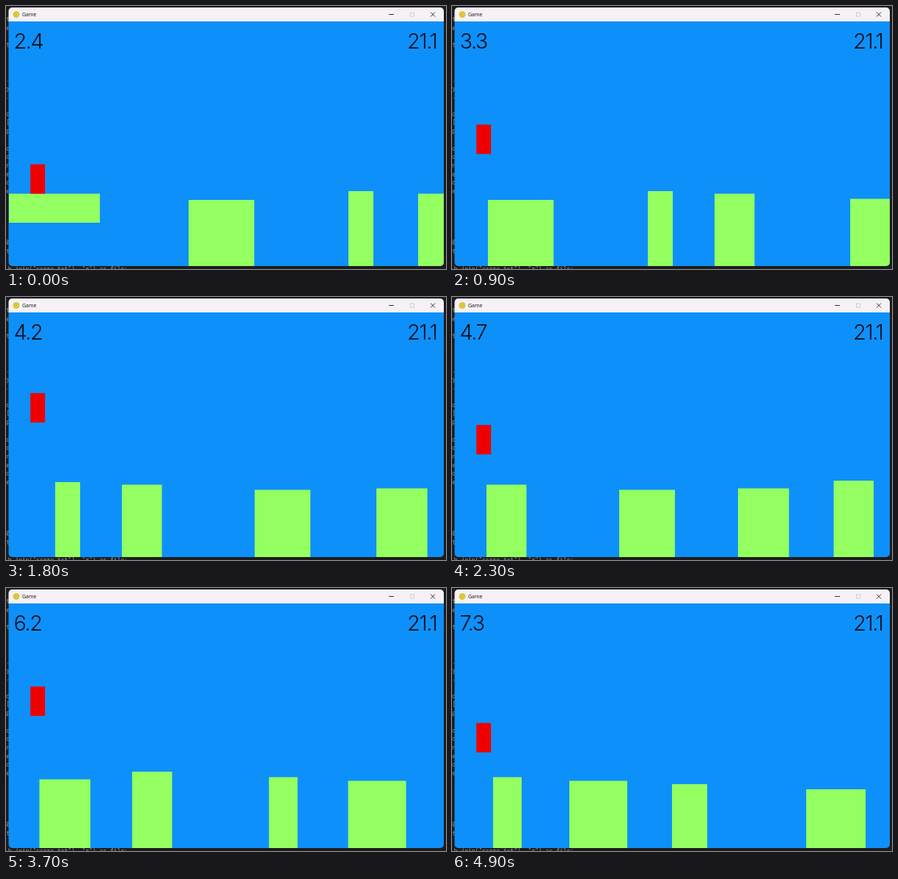
Write an HTML page with a canvas that moves like this. It is 600 px wide and 358 px high and loops after 5 s.

```html
<!DOCTYPE html>
<html lang="en">
<head>
<meta charset="utf-8">
<title>Game</title>
<style>
html, body { margin: 0; width: 100%; height: 100%; overflow: hidden; background: #1c1c1c; }
canvas { display: block; }
</style>
</head>
<body>
<canvas id="stage" width="600" height="358"></canvas>
<script>
const ctx = document.getElementById("stage").getContext("2d");
const LEFT = 4, STEP = 4, GRAVITY = 1290;
const PLAYER = { x: 33.2, w: 20, h: 40 };

// key points of the run: [seconds, scroll distance, score]
const TIME = 0, SCROLL = 1, SCORE = 2;
const run = [[0, 0, 2.4], [2.3, 511, 4.7], [3.1, 700, 5.5], [4.2, 985, 6.7], [4.9, 1158, 7.3]];

// the level: [x, width, top]; every platform from the fourth on is nudged once
const level = [
  [4, 124, 255.5], [249, 89.5, 264], [467, 34, 252], [562, 54.5, 255.5],
  [743, 76, 262.5], [905, 69.5, 260.5], [1031.5, 54.5, 250], [1218, 39, 257.5],
  [1322, 79, 262.5], [1462, 48, 267], [1641, 81, 274]
].map(([x, w, top], i) => ({ x, w, top, right: x + w - (i > 2 ? STEP : 0) }));

// the player leaps off each platform as its end arrives: [next platform, air time]
const leaps = [[1, 0.67], [2, 0.74], [3, 0.506], [4, 0.658], [6, 0.74], [7, 0.555]];

const editor = "t|e||ct||||.|ay|.||lo|[|pp||to|to|en|e|to|se||||||0|t".split("|");

function rect(color, x, y, w, h) {
  ctx.fillStyle = color;
  ctx.fillRect(x, y, w, h);
}

function text(str, x, y, font, color, spacing = "0px") {
  ctx.font = font;
  ctx.letterSpacing = spacing;
  ctx.fillStyle = color;
  ctx.fillText(str, x, y);
}

function line(x1, y1, x2, y2) {
  ctx.beginPath();
  ctx.moveTo(x1, y1);
  ctx.lineTo(x2, y2);
  ctx.stroke();
}

// reads one column of the run at a given value of another
function convert(value, from, to) {
  let i = 1;
  while (i < run.length - 1 && run[i][from] < value) i++;
  const a = run[i - 1], b = run[i];
  return a[to] + (b[to] - a[to]) * (value - a[from]) / (b[from] - a[from]);
}

function playerY(t) {
  let ground = level[0], y = ground.top;
  for (const [next, air] of leaps) {
    const age = t - convert(ground.right - PLAYER.x, SCROLL, TIME);
    if (age < 0) break;
    const p = Math.min(age / air, 1), goal = level[next];
    y = ground.top + (goal.top - ground.top) * p - GRAVITY / 2 * air * air * p * (1 - p);
    ground = goal;
  }
  return y - PLAYER.h;
}

// Four platforms live at once: when the oldest leaves, the newest
// takes one extra step and the next one appears.
function drawPlatforms(scroll) {
  const gone = i => i >= 0 && scroll > level[i].right - LEFT;
  level.forEach(({ x, w, top }, i) => {
    if (gone(i) || (i > 3 && !gone(i - 4))) return;
    const nudge = gone(i - 3) ? STEP : 0;
    rect("#94ff60", x - nudge - scroll, top, w, i ? 360 - top : 39.5);
  });
}

function drawDesktop() {
  const font = "8px 'Noto Sans Mono', monospace", color = "#8f9a9a";
  rect("#1c1c1c", 0, 0, 600, 358);
  editor.forEach((str, i) => text(str, 5 - 4.8 * str.length, 21 + 11.7 * i, font, color));
  text('_h.join("score.txt"), "r") as file:', -2, 361, font, color);
}

function drawTitleBar() {
  rect("#f6f1f6", 3, 2, 595, 19);
  ctx.fillStyle = "#dcc63c";
  ctx.beginPath();
  ctx.arc(14, 11.5, 4.5, 0, 7);
  ctx.fill();
  text("Game", 22, 14, "7px 'Open Sans', sans-serif", "#111");
  ctx.strokeStyle = "#ccd0d0";
  ctx.strokeRect(551.5, 9, 5, 5);
  ctx.strokeStyle = "#333";
  line(522, 11.5, 529, 11.5);
  line(579, 8.5, 585, 14.5);
  line(585, 8.5, 579, 14.5);
}

function draw(t) {
  const font = "300 29px Inter, sans-serif";
  drawDesktop();
  ctx.save();
  ctx.beginPath();
  ctx.roundRect(3.5, 2, 593.5, 352, 5);
  ctx.clip();
  rect("#0e90fa", 3, 21, 595, 334);
  drawPlatforms(convert(t, TIME, SCROLL));
  rect("#ee0000", PLAYER.x, playerY(t), PLAYER.w, PLAYER.h);
  text(convert(t, TIME, SCORE).toFixed(1), 10.5, 58, font, "#06101c", "-1.5px");
  text("21.1", 547, 58, font, "#06101c", "-1.5px");
  drawTitleBar();
  ctx.restore();
}

function tick() {
  draw(Math.floor(performance.now() / 100) % 50 / 10);
  requestAnimationFrame(tick);
}
tick();
</script>
</body>
</html>
```
